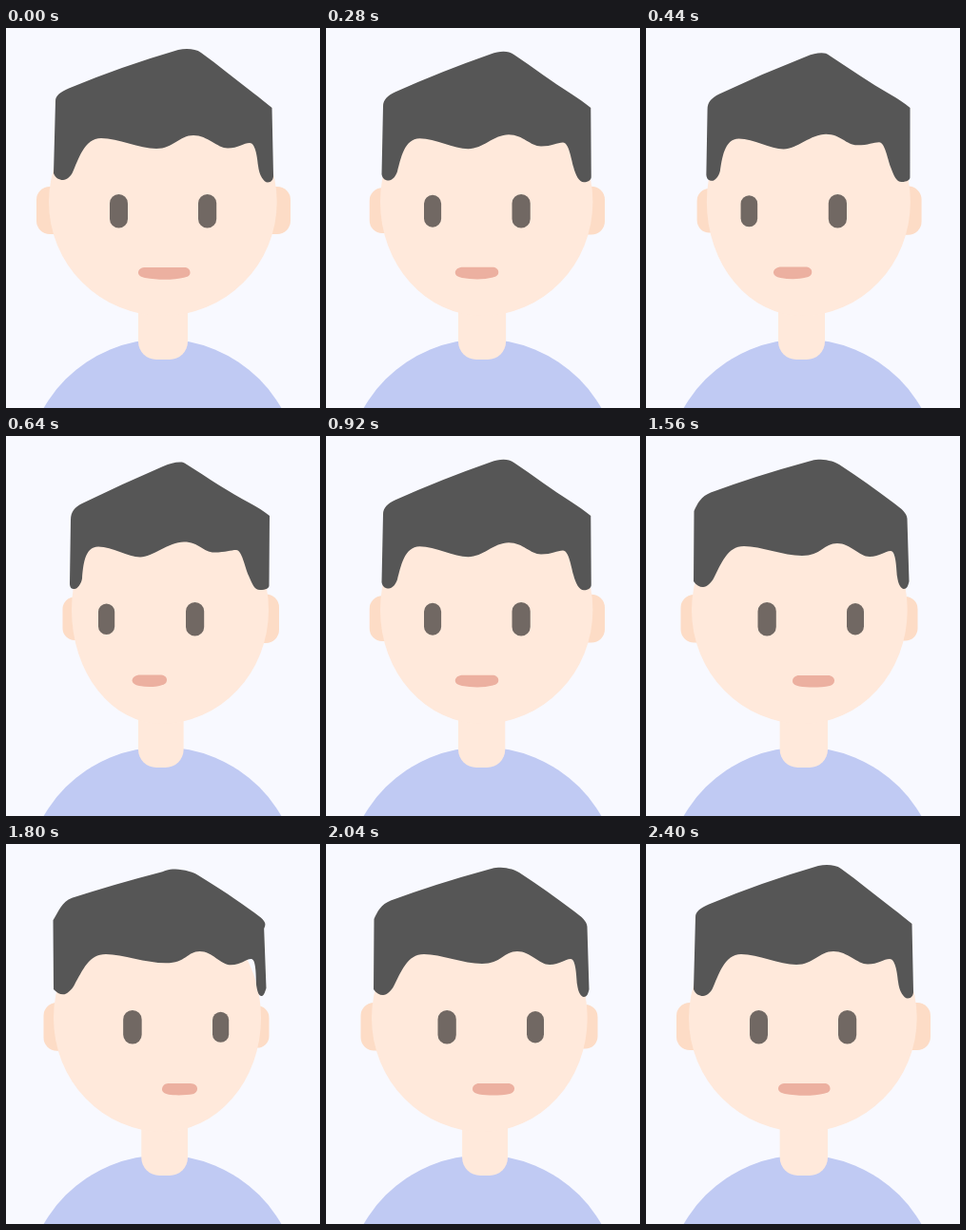
Write an HTML page that moves like this. It is 330 px wide and 400 px high and loops after 2440 ms.

```html
<!DOCTYPE html>
<html lang="en">
<head>
<meta charset="utf-8">
<title>Head turn</title>
<style>
  html, body { margin: 0; width: 100%; height: 100%; overflow: hidden; background: #f8f9ff; }
  svg { display: block; width: 330px; height: 400px; }
</style>
</head>
<body>
<svg id="stage" viewBox="0 0 330 400">
  <circle cx="164.5" cy="471.3" r="143.8" fill="#c0caf3"/>
  <rect id="neck" y="270" height="79" rx="19" fill="#ffe9db"/>
</svg>
<script>
const LOOP = 2440, STEP = 40;
const HEAD_QUARTER = 600, NECK_QUARTER = 660, NECK_SHIFT = 4.5;
// How far into the full turn the left and right poses below are drawn.
const LEFT_AT = 14 / 15, RIGHT_AT = 0.6;

const pill = (x, y, w, h, r) => {
  const R = x + w, B = y + h;
  return `M${x + r} ${y} L${R - r} ${y} A${r} ${r} 0 0 1 ${R} ${y + r} L${R} ${B - r} ` +
    `A${r} ${r} 0 0 1 ${R - r} ${B} L${x + r} ${B} A${r} ${r} 0 0 1 ${x} ${B - r} ` +
    `L${x} ${y + r} A${r} ${r} 0 0 1 ${x + r} ${y}Z`;
};

const oval = (left, mid, right) => {
  const a = mid - left, b = right - mid;
  return `M${left} 183 A${a} 120 0 0 0 ${mid} 303 A${b} 120 0 0 0 ${right} 183 ` +
    `A${b} 120 0 0 0 ${mid} 63 A${a} 120 0 0 0 ${left} 183Z`;
};

// Each part: colour, then its front, left and right poses.
const parts = [
  ['#fddcc6', pill(32, 167, 40, 50, 14), pill(59.5, 169.5, 36, 45.5, 12.5), pill(36.5, 167, 40, 50.5, 14)],
  ['#fddcc6', pill(259, 167, 40, 50, 14), pill(247, 166.5, 40, 51.5, 14), pill(247.5, 169, 38, 46.5, 13)],
  ['#ffe9db', oval(45, 165, 284.7), oval(69, 163, 276), oval(48, 165, 274.7)],
  ['#716863', pill(109, 175, 19, 35.5, 9.5), pill(97, 176.5, 17.2, 32.5, 8.6), pill(117.5, 175, 19.3, 35.5, 9.6)],
  ['#716863', pill(202, 175, 19.2, 35.5, 9.6), pill(189, 175, 19.2, 35.5, 9.6), pill(211, 176, 18, 33.5, 9)],
  ['#ecb0a0',
    'M147 252 L187 252 C191 252 193.5 254 193.5 257.5 C193.5 260 192 261.5 188 262.5 C176 265.5 160 265.5 146 263 C141 262 139 260 139 257.5 C139 254 142 252 147 252Z',
    'M141 251.5 L162 251.5 C166 251.5 169 253.5 169 256.5 C169 260 167 261.5 163 262.5 C156 264.5 148 264.5 140 263 C135.5 262 133 260.5 132.5 257.5 C133 254 136 251.5 141 251.5Z',
    'M161 252 L191 252 C195.5 252 198 254.5 198 257.5 C198 260.5 196 262 193 263 C184 265 170 265 161 263.5 C156 262.5 154 260.5 154 258 C154 254.5 157 252 161 252Z'],
  ['#565656',
    'M50 153 C52 158 56 160 60 160 S68 156 70 152 C76 139 82 116 100 116 S140 127 158 127 S182 113 197 113 S222 126.5 233 126.5 S250 121 256 121 S264 135 265 145 S271 162.5 275 162.5 S281.3 159 281 155 ' +
    'L279.5 84 C273 78.5 266 73 260 68.5 C241 54 223 39 205 26 C201 23 196 22 190 22 C187 22 184 22.3 181 23 Q121 40.5 66 63.5 C57 67.5 52 71 52 77Z',
    'M67 155 C67 160 69 161 72 161 S79 156 80 150 C81 138 82 116.5 97 116.5 S128 127.5 141 127.5 S171 111.5 187 111.5 S207 122.5 219 122.5 S236 120 242 120 S251 138 255 147 S261 162 267 162 S277 160 276.5 157 ' +
    'L277 84 C271 79 264 75 256 70.5 C234 59 212 44 190 30 C187 28 186 27.5 183 27.5 C177 27.5 172 29 165 32 Q122 50.5 80 71 C72 75 68 80 68 88Z',
    'M50 153 C53 157 56 159 60 159 S69 154 71 150 C79 135 85 116 103 116 S144 126 164 126 S187 113 201 113 S224 127 235 127 S251 121 257 121 S263 140 264 148 S268 161 271 161 S275.5 158 276.5 153 ' +
    'L274.5 87 C274 81 269 77 261 71 C243 57.5 223 43 203 30 C197 26 188 24.7 181 24.7 C178 24.7 175 25.5 171 26.7 Q115 42 68 59.5 C58 63.5 54 71 50.5 79Z']
];

const NUM = /-?\d+(?:\.\d+)?/g;
const mix = (from, to, k) => {
  const goal = to.match(NUM);
  let i = 0;
  return from.replace(NUM, n => +(+n + (goal[i++] - n) * k).toFixed(3));
};

// Straight swing 0, -1, 0, 1, 0: negative is left.
const swing = (t, quarter) => {
  const p = (t / quarter) % 4;
  return p < 1 ? -p : p < 3 ? p - 2 : 4 - p;
};

const stage = document.getElementById('stage');
const neck = document.getElementById('neck');
const nodes = parts.map(([fill]) => {
  const path = document.createElementNS(stage.namespaceURI, 'path');
  path.setAttribute('fill', fill);
  return stage.appendChild(path);
});

function draw(t) {
  const turn = swing(t, HEAD_QUARTER);
  parts.forEach(([, front, left, right], i) => {
    const d = turn < 0 ? mix(front, left, -turn / LEFT_AT) : mix(front, right, turn / RIGHT_AT);
    nodes[i].setAttribute('d', d);
  });
  const shift = swing(t, NECK_QUARTER) * NECK_SHIFT;
  neck.setAttribute('x', 139 + Math.max(0, shift));
  neck.setAttribute('width', 52 - Math.abs(shift));
}

const start = performance.now();
function tick() {
  const t = (performance.now() - start) % LOOP;
  draw(Math.floor(t / STEP) * STEP);
  requestAnimationFrame(tick);
}
tick();
</script>
</body>
</html>
```
